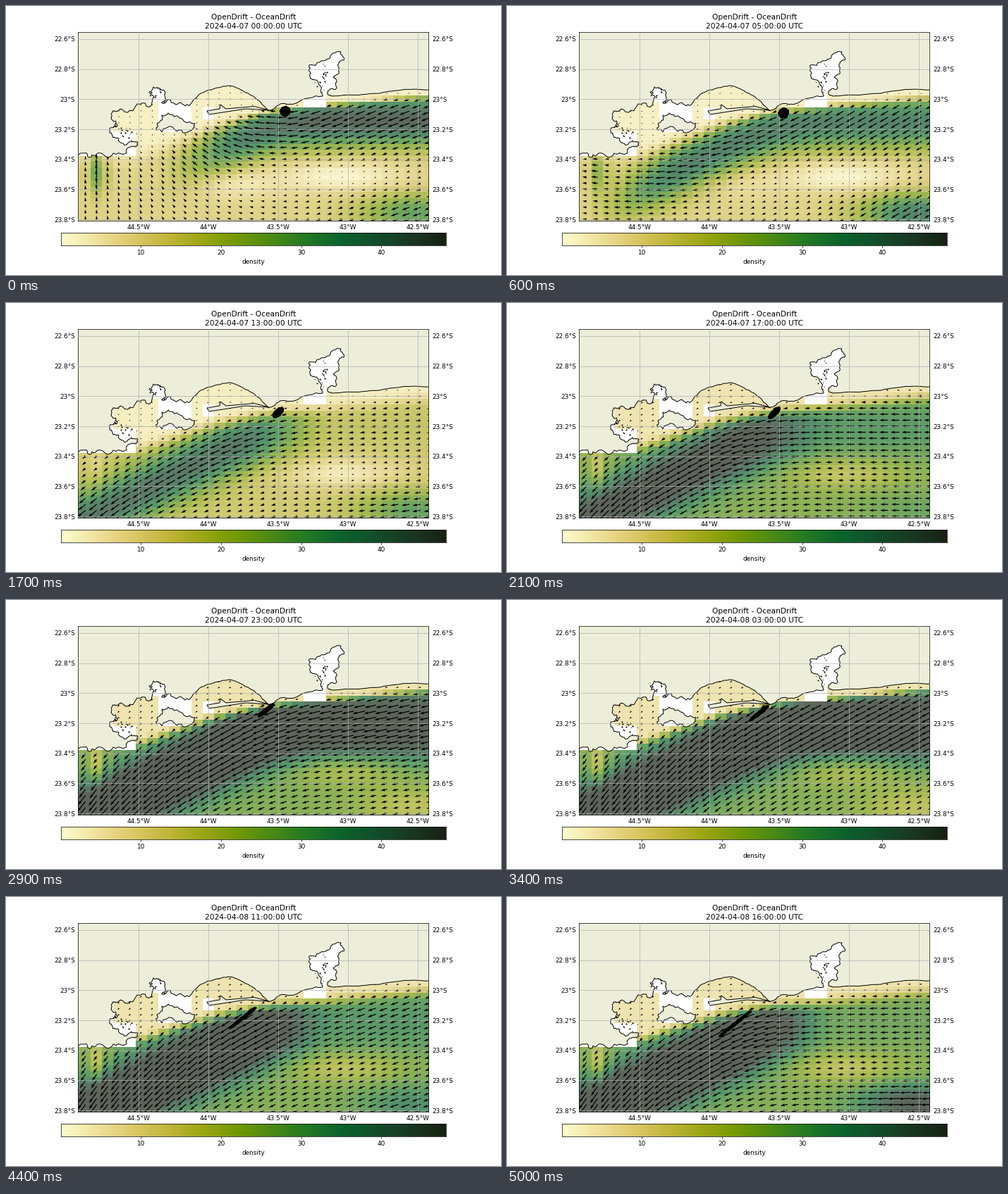
Write a matplotlib script that moves like this. It is 702 px wide and 382 px high and loops after 5.1 s.

```python
import random

import numpy as np
import matplotlib.pyplot as plt
from matplotlib.animation import FuncAnimation
from matplotlib.colors import LinearSegmentedColormap
from matplotlib.patches import Polygon

W, H, DPI = 702, 382, 64
FRAMES, STEP_MS = 51, 100
LEFT, TOP, RIGHT, BOTTOM = 102.4, 37.2, 599.4, 305.2
DX, DY = 15.84, 8.535  # model cell in pixels
LAND = "#edeeda"

plt.rcParams.update({"font.family": "DejaVu Sans", "font.size": 9.97,
                     "axes.linewidth": 0.8})

SPEED = LinearSegmentedColormap.from_list("speed", [
    "#fefccd", "#efe19c", "#ddc96a", "#c2b63b", "#9da715", "#749905",
    "#4b8a14", "#237924", "#0b642c", "#124e2b", "#193822", "#172312"])
SPEED.set_bad((1, 1, 1, 0))

# Key points of the coast, west to east; the detail is added by rough().
WEST = [(90, 206), (111, 209), (127, 212), (152, 209), (177, 200), (187, 194),
        (175, 193), (160, 188), (147, 180), (158, 170), (149, 160), (151, 149),
        (162, 146), (186, 139), (208, 133), (203, 122), (218, 117), (226, 130),
        (221, 138), (245, 138), (263, 138)]
MIDDLE = [(263, 138), (283, 121), (316, 113), (338, 122), (358, 134), (372, 149),
          (389, 139), (412, 138), (449, 128)]
HARBOUR = [(449, 128), (447, 118), (440, 105), (431, 100), (430, 84), (446, 79),
           (460, 73), (475, 65), (479, 77), (472, 90), (464, 101), (469, 116),
           (456, 125), (462, 128)]
EAST = [(462, 128), (500, 126.5), (530, 124), (550, 120.5), (610, 119)]
ISLAND = [(221, 155), (238, 157), (268, 167), (266, 173), (242, 178), (213, 176),
          (216, 166), (221, 155)]
SANDBAR = [(285, 149), (303, 146), (304, 140), (312, 146), (352, 142.5),
           (373, 148), (340, 146), (288, 154), (285, 149)]


def rough(points, amount, rng, depth=3):
    """Add sideways jitter at the midpoints of a line."""
    for _ in range(depth):
        out = [points[0]]
        for (x0, y0), (x1, y1) in zip(points, points[1:]):
            k = rng.uniform(-amount, amount)
            out += [((x0 + x1) / 2 + k * (y1 - y0),
                     (y0 + y1) / 2 - k * (x1 - x0)), (x1, y1)]
        points = out
    return points


def smooth(t):
    t = np.clip(t, 0, 1)
    return t * t * (3 - 2 * t)


def wave(hour, peak, period):
    return np.cos(2 * np.pi * (hour - peak) / period)


def eddy(x, y, sx, sy):
    return np.exp(-((X - x) / sx) ** 2 / 2 - ((Y - y) / sy) ** 2 / 2)


def box(left, top, right, bottom):
    return [left / W, 1 - bottom / H, (right - left) / W, (bottom - top) / H]


# Model grid in stage pixels, with the cells that hold data.
xs = 477.1 + DX * np.arange(-24, 9)
ys = 132.3 + DY * np.arange(-2, 21)
X, Y = np.meshgrid(xs, ys)

first_y = np.select([X < 184, X < 215, X < 263, X < 421, X < 453],
                    [213, 136, 179, 111, 145], 117)
wet = Y > first_y
wet |= (abs(X - 168) < 16) & (abs(Y - 161) < 17)
wet &= ~((abs(X - 287) < 8) & (abs(Y - 153.5) < 8.5))

shore_y = np.interp(X, (184, 300, 375, 453, 600), (195, 158, 143, 136, 122))


def speed_field(hour):
    """Relative current speed: a coastal jet, a calm core and a southern flow."""
    rise = smooth((hour - 11) / 7)
    jet_y = 163 + 16 * smooth(hour / 20) + 15 * np.log1p(np.exp((380 - X) / 30))
    east = 0.4 + 0.36 * wave(hour, 1, 25)
    front = smooth((X - 200 + 20 * hour) / 150)
    west = front * (0.6 + 0.35 * smooth((hour - 16) / 7))
    gain = east + (west - east) * smooth((470 - X) / 150)
    width = 25 + 8 * smooth(hour / 23)

    s = 0.22 + 0.3 * rise + gain * np.exp(-((Y - jet_y) / width) ** 2 / 2)
    s -= 0.2 * eddy(475, 242, 60, 15)
    s -= 0.13 * np.exp(-hour / 8) * eddy(325, 253, 40, 15)
    s += (0.2 + 0.4 * wave(hour, 6, 38)) * eddy(580, 295, 55, 20)

    # Calm water near the shore.
    reach = np.interp(X, (184, 375), (15 + 30 * np.exp(-hour / 15),
                                      20 - 8 * wave(hour, 1, 25)))
    calm = 0.06 + 0.06 * rise
    s = calm + smooth((Y - shore_y) / reach) * (s - calm)
    s += (0.35 - 0.6 * smooth(hour / 20)) * eddy(130, 235, 9, 22)
    return np.maximum(s, 0.02)


def angle_field(hour):
    east = 195 + 15 * wave(hour, 5, 25)
    west = 235 - 140 * np.exp(-hour / 6)
    return np.radians(east + (west - east) * np.clip((450 - X) / 320, 0, 1))


def cloud_at(hour):
    """Particles of a disc that drifts, stretches and thins."""
    hours = (0, 13, 23, 31, 40)
    cx = np.interp(hour, hours, (395.5, 385.5, 368.5, 345.5, 323))
    cy = np.interp(hour, hours, (149, 155, 156, 164.5, 179.5))
    tilt = np.radians(45 - 6 * smooth((hour - 17) / 6))
    u = along * (6.4 + 0.0142 * hour ** 2)
    v = across * (1.4 + 5 * np.exp(-(hour / 17) ** 2))
    return (cx + u * np.cos(tilt) + v * np.sin(tilt),
            cy - u * np.sin(tilt) + v * np.cos(tilt))


fig = plt.figure(figsize=(W / DPI, H / DPI), dpi=DPI, facecolor="white")
ax = fig.add_axes(box(LEFT, TOP, RIGHT, BOTTOM))

field = ax.imshow(np.zeros_like(X), cmap=SPEED, vmin=0, vmax=1, alpha=0.7,
                  interpolation="nearest", aspect="auto", zorder=1,
                  extent=(xs[0] - DX / 2, xs[-1] + DX / 2,
                          ys[-1] + DY / 2, ys[0] - DY / 2))
arrows = ax.quiver(X[wet], Y[wet], X[wet] * 0, X[wet] * 0, units="dots",
                   scale_units="dots", scale=1, width=1.25, color="black",
                   zorder=1.5)

rng = random.Random(4)
mainland = (rough(WEST, 0.36, rng) + rough(MIDDLE, 0.09, rng)
            + rough(HARBOUR, 0.28, rng) + rough(EAST, 0.03, rng)
            + [(610, 30), (90, 30)])
for shape in (mainland, rough(ISLAND, 0.3, rng), SANDBAR):
    ax.add_patch(Polygon(shape, facecolor=LAND, edgecolor="black", lw=1.1, zorder=2))

# Small islets in the three bays: centre, spread, count.
for cx, cy, sx, sy, count in ((165, 179, 8, 5, 18), (212, 127, 6, 5, 12),
                              (450, 100, 4, 10, 20)):
    for _ in range(count):
        ax.plot(rng.gauss(cx, sx), rng.gauss(cy, sy), "o", color="black",
                ms=rng.uniform(0.8, 2.6), mew=0, zorder=3)

dots = np.random.default_rng(7)
radius = np.sqrt(dots.random(500))
theta = dots.random(500) * 2 * np.pi
along, across = radius * np.cos(theta), radius * np.sin(theta)
cloud, = ax.plot([], [], "o", color="black", ms=2.8, mew=0, zorder=5)

ax.set_xlim(LEFT, RIGHT)
ax.set_ylim(BOTTOM, TOP)
ax.set_xticks([188 + 99 * i for i in range(5)],
              [f"{44.5 - 0.5 * i:g}°W" for i in range(5)])
ax.set_yticks([47 + 42.67 * i for i in range(7)],
              [f"{22.6 + 0.2 * i:g}°S" for i in range(7)])
ax.tick_params(length=0, pad=5, labelright=True)
ax.set_axisbelow(False)
ax.grid(color="#b0b0b0", lw=0.8, zorder=2.5)
title = ax.set_title("", fontsize=11.95, linespacing=1.42)

bar = fig.add_axes(box(78, 322, 624, 340))
bar.imshow(np.linspace(0, 1, 256)[None], cmap=SPEED, aspect="auto",
           extent=(0.07, 48.05, 0, 1))
bar.set_yticks([])
bar.set_xticks([10, 20, 30, 40])
bar.set_xlabel("density")


def draw(i):
    hour = (4 * i + 1) // 5
    title.set_text("OpenDrift - OceanDrift\n"
                   f"2024-04-{7 + hour // 24:02d} {hour % 24:02d}:00:00 UTC")

    speed, angle = speed_field(hour), angle_field(hour)
    field.set_data(np.ma.masked_where(~wet, np.clip(speed, 0, 1)))
    size = 17 * np.minimum(speed, 1.15) ** 0.75
    arrows.set_UVC((size * np.cos(angle))[wet], (size * np.sin(angle))[wet])
    cloud.set_data(*cloud_at(hour))
    return title, field, arrows, cloud


anim = FuncAnimation(fig, draw, frames=FRAMES, interval=STEP_MS,
                     repeat=True, repeat_delay=0, blit=False)
plt.show()
```
